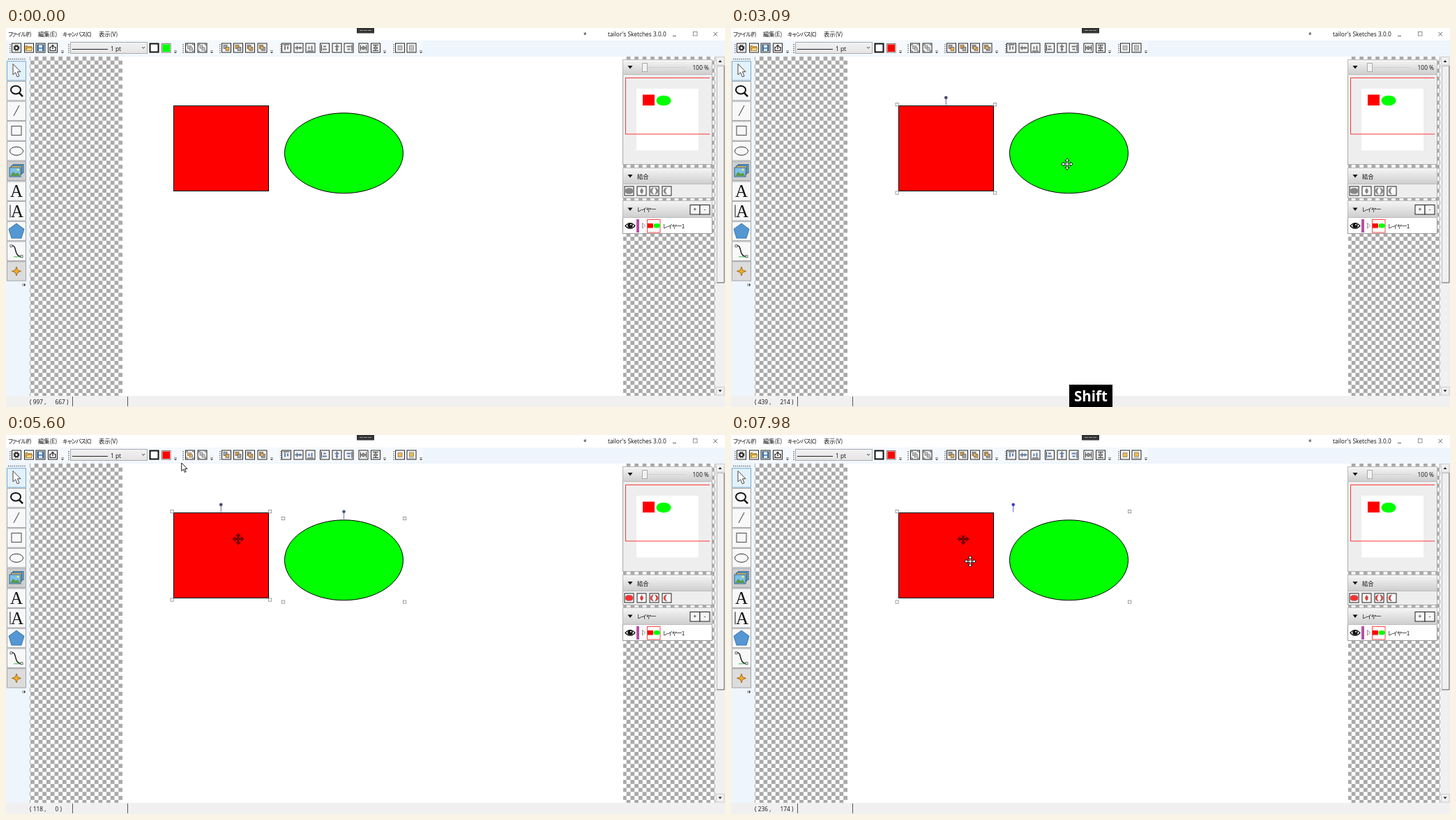
An HTML page that plays this animation: 1031 px wide and 543 px high, repeating every 8000 ms.

```html
<!DOCTYPE html>
<html lang="ja">
<head>
<meta charset="utf-8">
<title>Drawing editor</title>
<style>
html, body { margin: 0; width: 100%; height: 100%; overflow: hidden; background: #fff; }
svg { display: block; width: 1031px; height: 543px; }
text { font: 8.4px "Open Sans", "Noto Sans CJK JP", "Noto Sans", sans-serif; fill: #111; white-space: pre; }
.kanji { font-family: "Noto Sans CJK JP", "Noto Sans CJK", sans-serif; }
.kana { font: 8.2px "Noto Sans CJK JP", "Noto Sans CJK", sans-serif; font-feature-settings: "palt"; letter-spacing: -.8px; }
.serif { font: 25px "Liberation Serif", serif; }
.key { font: bold 20.5px "Open Sans", "Noto Sans", sans-serif; fill: #fff; }
</style>
</head>
<body>
<svg id="stage" viewBox="0 0 1031 543" xmlns="http://www.w3.org/2000/svg"></svg>
<script>
const LOOP = 8000, SCALE = 0.717;
const PAGE = { x: 167, y: 41 };
const stage = document.getElementById('stage');

const rect = (x, y, w, h, fill, stroke = 'none', more = '') =>
  `<rect x="${x}" y="${y}" width="${w}" height="${h}" fill="${fill}" stroke="${stroke}" ${more}/>`;
const oval = (x, y, rx, ry, fill, stroke = 'none', more = '') =>
  `<ellipse cx="${x}" cy="${y}" rx="${rx}" ry="${ry}" fill="${fill}" stroke="${stroke}" ${more}/>`;
const path = (d, fill = 'none', stroke = 'none', w = 1, more = '') =>
  `<path d="${d}" fill="${fill}" stroke="${stroke}" stroke-width="${w}" ${more}/>`;
const text = (x, y, s, cls = '', more = '') => `<text x="${x}" y="${y}" class="${cls}" ${more}>${s}</text>`;
const label = (x, y, s) => text(x, y, s, /[ァ-ヶ]/.test(s) ? 'kana' : 'kanji');
const group = (x, y, body, more = '') => `<g transform="translate(${x} ${y})" ${more}>${body}</g>`;
const dots = (x, y, w, h) => path(`M${x} ${y}h${w}v${h}`, 'none', '#666', 1.4, 'stroke-dasharray="1.4 1.5"');

const ARROW = 'M0 0V11.6L2.7 9.1L4.6 13.4L6.4 12.6L4.6 8.4H8.2Z';
const MOVE = 'M0-8L3-4.8H1V-1H4.8V-3L8 0L4.8 3V1H1V4.8H3L0 8L-3 4.8H-1V1H-4.8V3L-8 0L-4.8-3V-1H-1V-4.8H-3Z';

function menu() {
  return rect(0, 0, 1031, 18, '#fff')
    + [[3, 'ファイル(F)'], [46, '編集(E)'], [81, 'キャンバス(C)'], [133, '表示(V)']]
      .map(([x, s]) => label(x, 12, s)).join('')
    + text(828, 13, '*') + text(863, 12, "tailor's Sketches 3.0.0")
    + rect(503, 0, 25, 7.5, '#333') + path('M507 3.5H524', 'none', '#999', 1, 'stroke-dasharray="5 1"')
    + path('M956 11.5H961M1014.5 6L1020 11.5M1020 6L1014.5 11.5', 'none', '#555', .9)
    + rect(985.5, 5.5, 5.5, 5.5, 'none', '#777', 'stroke-width=".8"');
}

const box = (x, body, id = '') =>
  group(x, 28.5, rect(-6.5, -6.5, 13, 13, '#f6f6f6', '#222', id && `id="${id}"`) + body);
const warm = (x, y, w, h) => rect(x, y, w, h, '#c4c4c4', '#777', 'class="warm" stroke-width=".7"');

function toolbar() {
  const gear = oval(0, 0, 3.4, 3.4, 'none', '#222', 'stroke-width="2.2" stroke-dasharray="1.7 .97"')
    + oval(0, 0, 2.4, 2.4, 'none', '#222', 'stroke-width="1.5"');
  const folder = path('M-5 4V-3H-2L-1-2H4V4Z', '#dca53d', '#8b6b28', .7) + path('M-5 4L-2 0H5L3 4Z', '#ffd982', '#8b6b28', .6);
  const disk = rect(-4.5, -4.5, 9, 9, '#3b78b5', '#244b70') + rect(-2.5, -4, 5, 3.5, '#fff') + rect(-2.5, 1, 5, 3.5, '#d8e5ef');
  const exportIcon = path('M-2-1H-4V4H4V-1H2M0 2V-4M-2-2L0-4L2-2', 'none', '#222', 1.2);
  const corners = path('M-5-3V-5H-3M3-5H5V-3M5 3V5H3M-3 5H-5V3', 'none', '#777', 1);
  const order = k => rect(-4, -4, 5, 5, k % 2 ? '#e3a03c' : '#aaa', '#555', 'stroke-width=".7"')
    + rect(-1, -1, 5, 5, k % 2 ? '#aaa' : '#e8ac4b', '#555', 'stroke-width=".7"')
    + (k > 1 ? rect(-2.5, -2, 4, 4, '#f0bc66', '#555', 'stroke-width=".6"') : '');
  const bars = rect(-3, -3, 2, 6, '#777', 'none', 'class="bar"') + rect(1, -2, 2, 4, '#777', 'none', 'class="bar"');
  const alignTop = path('M-4.5-4.5H4.5', 'none', '#222') + bars;
  const alignMid = path('M-5 0H5', 'none', '#222') + bars;
  const turn = (a, s) => `<g transform="rotate(${a})">${s}</g>`;
  const spread = path('M-4-4V4M4-4V4M-4 0H4', 'none', '#333') + rect(-1.5, -2.5, 3, 5, '#999', '#444', 'stroke-width=".6"');
  const pair = rect(-3.5, -3, 5, 4, '#bbb', '#777', 'stroke-width=".7"') + rect(-1, -.5, 4.5, 4, '#ccc', '#777', 'stroke-width=".7"');

  let s = rect(0, 18, 1031, 23, '#eef5fd') + rect(4, 19, 594, 20, '#f5f9fe');
  for (const x of [6, 90, 254, 307, 394, 556]) s += dots(x, 23, 0, 13);
  for (const x of [81, 243, 295, 381, 543, 595])
    s += path(`M${x - 2} 32.5h4M${x - 1.6} 34.5h3.2l-1.6 1.6z`, '#444', '#444', .6);
  s += box(15, gear) + box(33, folder) + box(49.5, disk) + box(67, exportIcon)
    + rect(92.5, 20.5, 110, 16, 'url(#face)', '#aaa') + path('M95 30.5H146', 'none', '#222') + text(150, 33, '1 pt')
    + path('M195 27L197 29.2L199 27', 'none', '#444')
    + rect(206.5, 22.5, 12, 12, '#fff', '#111', 'stroke-width="2"')
    + rect(223.5, 22.5, 12.5, 12.5, '#fff', '#777') + rect(224.5, 23.5, 10.5, 10.5, '#0f0', 'none', 'id="swatch"');
  s += box(264, corners + `<g id="grp">${pair}</g>`, 'grpBox')
    + box(281.5, corners + rect(-3.5, -3.5, 4, 4, '#ccc', '#666', 'stroke-width=".7"') + rect(-.5, -.5, 4, 4, '#ccc', '#666', 'stroke-width=".7"'));
  [316, 333, 350, 367.5].forEach((x, k) => s += box(x, order(k)));
  [402, 419.5, 436.5].forEach((x, k) => s += box(x, k === 1 ? alignMid : turn(k * 90, alignTop)));
  [457, 474.5, 491.5].forEach((x, k) => s += box(x, turn(k === 1 ? 90 : k * 90 - 90, k === 1 ? alignMid : alignTop)));
  s += box(512.5, spread) + box(530, turn(90, spread));
  return s + box(565, warm(-3, -3, 6, 6)) + box(581.5, warm(-3, -3.5, 6, 6) + path('M-4 4.5H4', 'none', '#777', .8));
}

function toolbox() {
  const icons = [
    path('M-5-10V5.5L-1.4 2.2L1.2 8.4L4 7.3L1.4 1.2H6Z', '#fff', '#444', 1),
    oval(-1, -1.5, 7, 5.8, 'none', '#111', 'stroke-width="2"') + path('M4 3L9 8', 'none', '#111', 2.6),
    path('M-4 7L4-8', 'none', '#333'),
    rect(-7, -7, 14, 13, 'none', '#444'),
    oval(0, 0, 9.5, 6, 'none', '#333'),
    rect(-5, -9.5, 15, 12, '#5fa9d8', '#37638a') + rect(-7.5, -7.5, 15, 12, '#e8c35a', '#37638a')
      + rect(-10, -5, 16, 13, '#7cc0ea', '#37638a') + path('M-9 7L-5 1L-1 4L2 2L5 7Z', '#5b9a4a') + oval(2, -2, 1.5, 1.5, '#fe6'),
    text(0, 8.5, 'A', 'serif', 'text-anchor="middle"'),
    path('M-9-9V9', 'none', '#111') + text(1, 8.5, 'A', 'serif', 'text-anchor="middle"'),
    path('M0-11L11-3L7 10H-7L-11-3Z', '#5597d3', '#3977ae'),
    path('M-8-8C2-10-5 7 7 8', 'none', '#111', 1.4) + path('M-4 8H8', 'none', '#39b54a')
      + rect(-9, -9, 3, 3, '#fff', '#333', 'stroke-width=".7"') + rect(6, 6, 3, 3, '#fff', '#333', 'stroke-width=".7"'),
    path('M0-6.5L1.7-1.7L6.5 0L1.7 1.7L0 6.5L-1.7 1.7L-6.5 0L-1.7-1.7Z', '#f5ac24', '#8a5b15', .8)
  ];
  let s = rect(0, 41, 34, 486, '#eef5fd') + dots(3, 44.5, 25, 0);
  icons.forEach((icon, i) => {
    const fill = i === 0 ? '#e3f1fb' : i === 5 ? '#cfcfcf' : i === 10 ? '#dcdcdc' : '#f8f8f8';
    s += group(15, 61.5 + i * 28.7, rect(-13.5, -13.8, 27, 27.4, fill, i ? '#a5a5a5' : '#78aacb') + icon);
  });
  return s + path('M24 366v4M26 366l2 2l-2 2z', '#444', '#444', .6);
}

const header = (y, h) => rect(884.5, y + .5, 128, h, 'url(#head)', '#bbb')
  + path(`M891.5 ${y + h / 2 - 1.5}h7l-3.5 4.5z`, '#111');

function panels() {
  let s = rect(884.5, 45.5, 128, 150, '#eee', '#aaa') + header(45, 21)
    + path('M920 56.5H975', 'none', '#d0d0d0') + rect(912.5, 50.5, 7, 12, '#f3f3f3', '#aaa')
    + text(1008, 59.5, '100 %', '', 'text-anchor="end"')
    + rect(904, 87, 89, 88.5, '#fff') + rect(913, 95.5, 17, 15.5, '#f00') + oval(943, 104, 10.6, 7.3, '#0f0')
    + path('M1009 71.5H888.5V152H1009', 'none', '#f33');
  s += rect(884.5, 200.5, 128, 43, '#eee', '#aaa') + header(200, 23) + label(905, 216, '結合');
  const shapes = [
    'M-1.5-4A4 4 0 0 0-1.5 4H1.5A4 4 0 0 0 1.5-4Z',
    'M0-4Q4 0 0 4Q-4 0 0-4Z',
    'M-1-4.5A4.5 4.5 0 0 0-1 4.5Q-5 0-1-4.5ZM1-4.5A4.5 4.5 0 0 1 1 4.5Q5 0 1-4.5Z',
    'M0-4.5A4.5 4.5 0 0 0 0 4.5Q-4 0 0-4.5Z'
  ];
  shapes.forEach((d, i) => s += group(893.5 + i * 18, 233.5,
    rect(-6.5, -6.5, 13, 13, '#fafafa', '#222') + path(d, '#888', '#777', .5, 'class="bool"')));
  s += rect(884.5, 247.5, 128, 47, '#fff', '#999') + header(247, 24) + label(905, 263, 'レイヤー')
    + rect(981, 253.5, 14, 13.5, '#f6f6f6', '#222') + rect(995, 253.5, 14, 13.5, '#f6f6f6', '#222')
    + text(988, 263, '+', '', 'text-anchor="middle"') + text(1002, 263, '-', '', 'text-anchor="middle"')
    + path('M888 283.5Q895 275.5 902 283.5Q895 291 888 283.5Z', '#fff', '#111', 1.2) + oval(895, 283, 3.7, 3.7, '#111') + oval(896, 281.8, 1, 1, '#fff')
    + rect(904, 274, 4, 19, '#b84fa8') + path('M912.5 279.5V287L916.5 283.2Z', '#fff', '#777', .8)
    + rect(919.5, 274.5, 18.5, 18.5, '#fff', '#f44') + rect(920, 280, 8, 6.5, '#f00') + oval(933.2, 283.2, 4.7, 3.3, '#0f0')
    + label(942, 286.5, 'レイヤー1');
  return s;
}

function frameParts() {
  return rect(1017, 41, 14, 486, '#f0f0f0')
    + rect(1018.5, 41.5, 11.5, 11.5, '#f0f0f0', '#ccc') + path('M1021.5 49h5l-2.5-3z', '#222')
    + rect(1019.5, 54.5, 10, 310, '#f0f0f0', '#bbb') + path('M1030 54V365H1019', 'none', '#777')
    + rect(1018.5, 514.5, 11.5, 11.5, '#f0f0f0', '#ccc') + path('M1021.5 518.5h5l-2.5 3z', '#222')
    + rect(0, 527, 1031, 16, '#f0f0f0')
    + path('M95.5 528V542M174.5 528V542', 'none', '#555')
    + '<text id="posX" x="34" y="539"></text><text id="posY" x="70.5" y="539"></text>';
}

function handles(id, l, t, r, b, ink) {
  const cx = (l + r) / 2;
  let s = path(`M${cx} ${t - 8}V${t + 1}`, 'none', ink, .8) + oval(cx, t - 9.7, 2.3, 2.3, ink);
  for (const x of [l, r]) for (const y of [t, b]) s += rect(x - 2, y - 2, 4.2, 4.2, '#fff', '#888', 'stroke-width=".8"');
  return `<g id="${id}">${s}</g>`;
}

// the chequered backdrop is anchored to the page corner
const cell = 8 * SCALE;
stage.innerHTML = `<defs>
  <linearGradient id="head" x2="0" y2="1"><stop stop-color="#f6f6f6"/><stop offset="1" stop-color="#cecece"/></linearGradient>
  <linearGradient id="face" x2="0" y2="1"><stop stop-color="#f2f2f2"/><stop offset="1" stop-color="#e4e4e4"/></linearGradient>
  <pattern id="check" x="${PAGE.x}" y="${PAGE.y}" width="${cell * 2}" height="${cell * 2}" patternUnits="userSpaceOnUse">
    ${rect(0, 0, cell * 2, cell * 2, '#fff')}${rect(0, 0, cell, cell, '#a9a9a9')}${rect(cell, cell, cell, cell, '#a9a9a9')}
  </pattern></defs>`
  + rect(34, 41, 983, 486, 'url(#check)') + rect(PAGE.x, PAGE.y, 718, 486, '#fff')
  + rect(240.5, 111.5, 136, 122, '#f00', '#000') + oval(484.5, 179.3, 85, 57.5, '#0f0', '#000')
  + group(333, 149, path(MOVE, '#8c0000', '#480000', .8), 'id="ghost"')
  + rect(324, 140, 18, 4, '#f00', 'none', 'id="wipe"')
  + handles('selRect', 238, 109.5, 378.5, 236, '#44446e')
  + handles('selOval', 397.5, 119.5, 571.5, 239, '#44547e')
  + handles('selBoth', 238, 109.5, 571.5, 239, '#3c3cc8')
  + menu() + toolbar() + toolbox() + panels() + frameParts()
  + `<g id="tip">${rect(262, 43.5, 40, 17, '#fff', '#aaa', 'rx="2"')}${label(266, 55, 'グループ化')}</g>`
  + `<g id="key">${rect(485, 511, 62, 32, '#000')}${text(516, 535, 'Shift', 'key', 'text-anchor="middle"')}</g>`
  + `<g id="arrow">${path(ARROW, '#fff', '#000', .9)}</g><g id="move">${path(MOVE, '#fff', '#000', .9)}</g>`;

// start, end, steps, [progress, x, y] along the way, read-out at rest
const moves = [
  [330, 1100, 12, [[0, 880, 512], [.083, 852, 502], [.3, 660, 425], [.6, 340, 315], [.8, 225, 288], [1, 198, 284]], [46, 340]],
  [1170, 1940, 12, [[0, 198, 284], [.2, 212, 270], [.5, 265, 205], [.75, 300, 172], [1, 306, 186]], [193, 202]],
  [2810, 3090, 5, [[0, 306, 186], [.2, 322, 187], [.5, 405, 192], [1, 482, 195]], [439, 214]],
  [4210, 4980, 12, [[0, 482, 195], [.25, 450, 188], [.583, 333, 149], [.8, 280, 75], [1, 258, 43]], [128, 4]],
  [5050, 5810, 11, [[0, 258, 43], [.7, 252, 41], [1, 249, 30]], [118, 0]],
  [5890, 6010, 3, [[0, 249, 30], [1, 262, 31]], [118, 0]],
  [7700, 7980, 5, [[0, 262, 31], [.4, 300, 108], [.8, 335, 166], [1, 343, 181]], [236, 174]]
];

function pointer(t) {
  const m = moves.filter(r => t >= r[0]).pop();
  if (!m) return { pos: [997, 667] };
  const [from, to, n, pts, rest] = m;
  const p = Math.min(1, (Math.floor((t - from) / (to - from) * (n - 1) + 1e-6) + 1) / n);
  const i = Math.max(1, pts.findIndex(q => q[0] >= p));
  const [a, b] = [pts[i - 1], pts[i]];
  const f = (p - a[0]) / (b[0] - a[0]);
  const x = a[1] + (b[1] - a[1]) * f, y = a[2] + (b[2] - a[2]) * f;
  const live = [Math.round((x - PAGE.x) / SCALE), Math.round((y - PAGE.y) / SCALE)];
  return { x, y, pos: p === 1 ? rest : y < PAGE.y ? [118, 0] : live };
}

const el = {};
stage.querySelectorAll('[id]').forEach(e => el[e.id] = e);
const show = (id, on) => el[id].style.display = on ? '' : 'none';
const paint = (q, c) => stage.querySelectorAll(q).forEach(e => e.setAttribute('fill', c));
const overShape = (x, y) => (x > 240 && x < 377 && y > 111 && y < 234)
  || ((x - 484.5) / 85) ** 2 + ((y - 179.3) / 57.5) ** 2 < 1;

function draw(t) {
  const { x, y, pos } = pointer(t);
  const over = overShape(x, y);
  show('arrow', x !== undefined && !over);
  show('move', over);
  if (x !== undefined) el[over ? 'move' : 'arrow'].setAttribute('transform', `translate(${x} ${y})`);
  el.posX.textContent = `( ${pos[0]} ,`;
  el.posY.textContent = `${pos[1]} )`;

  const one = t >= 2470, two = t >= 3420, joined = t >= 6830;
  show('selRect', one && !joined);
  show('selOval', two && !joined);
  show('selBoth', joined);
  show('ghost', t >= 4700);
  show('wipe', t >= 7840);
  show('key', t >= 2880 && t < 5430);
  show('tip', t >= 6360 && !joined);
  el.tip.style.opacity = t < 6430 ? .5 : t < 6500 ? .8 : 1;

  paint('#swatch', one ? '#f00' : '#0f0');
  paint('#grp rect', two && !joined ? '#e8b04d' : '#c4c4c4');
  paint('#grpBox', t >= 5950 && t < 7700 ? '#d5e7f3' : '#f6f6f6');
  paint('.warm', two ? '#f2b84b' : '#c4c4c4');
  paint('.bar', two ? '#5b7fb5' : '#777');
  paint('.bool', two ? '#ff3030' : '#888');
}

const start = performance.now();
function tick() {
  draw((performance.now() - start) % LOOP);
  requestAnimationFrame(tick);
}
tick();
</script>
</body>
</html>
```
